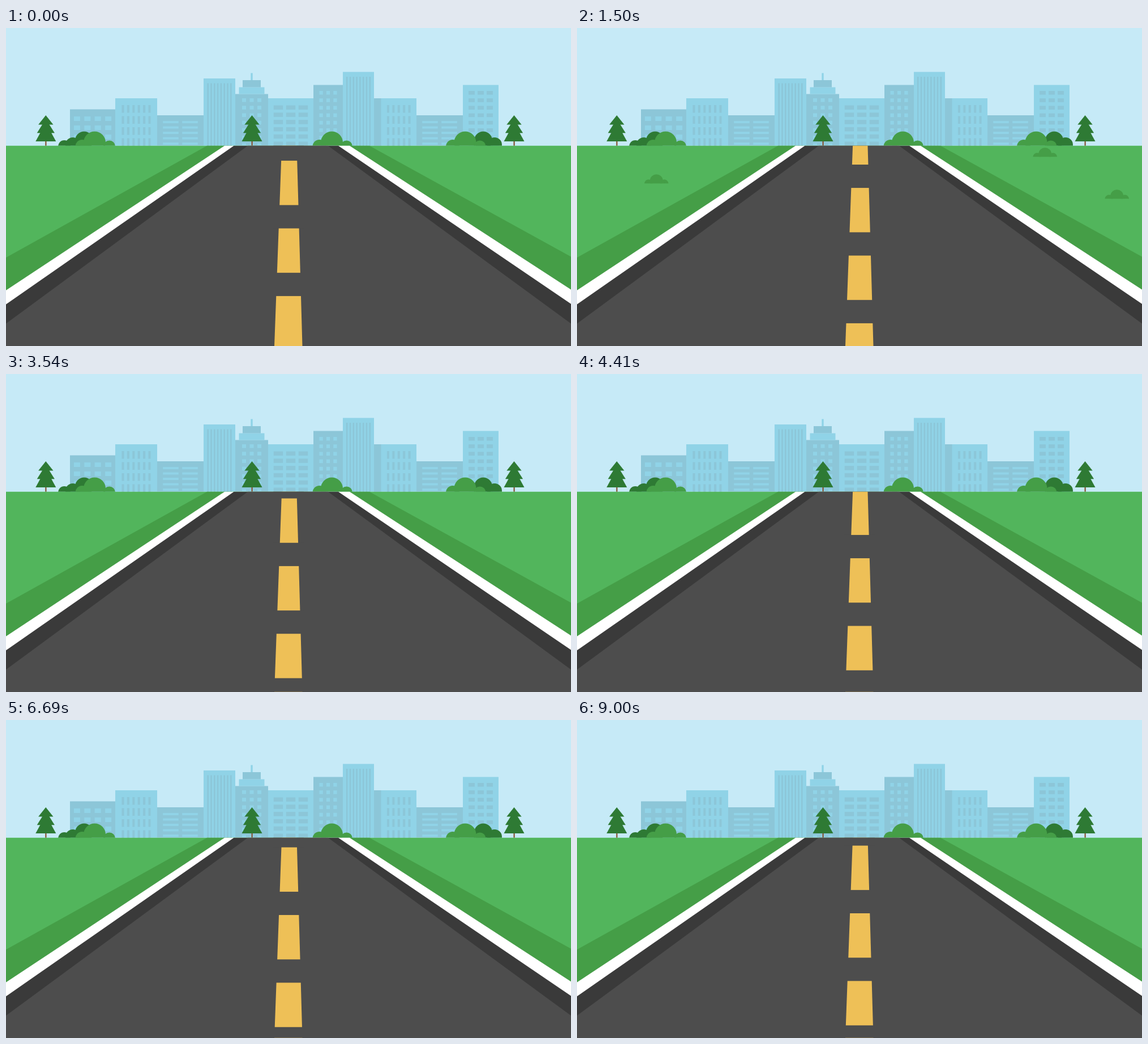
Recreate the animation shown at these times as an HTML page with a canvas. Size 998 px wide and 561 px high, loop 9030 ms.

```html
<!DOCTYPE html>
<html lang="en">
<head>
<meta charset="utf-8">
<title>Road</title>
<style>
html, body { margin: 0; width: 100%; height: 100%; overflow: hidden; background: #c6eaf7; }
canvas { display: block; width: 998px; height: 561px; }
</style>
</head>
<body>
<canvas id="stage" width="998" height="561"></canvas>
<script>
const W = 998, H = 561, HORIZON = 207.7;
const LOOP = 9030, STEP = 30;
const CYCLE = 60, CYCLES = 5, TRAVEL = 823.3;
const PITCH = 119.4, GAP = 41.1, FIRST_GAP = 431.8;
const C = {
  sky: '#c6eaf7', light: '#90d3e7', dark: '#8cc6d8', grass: '#52b55c', verge: '#459e47',
  tree: '#2e7a34', trunk: '#86512f', road: '#4d4d4d', edge: '#3a3a3a', line: '#eec057'
};

const stage = document.getElementById('stage').getContext('2d');
const scenery = document.createElement('canvas');
scenery.width = W;
scenery.height = H;

function rect(g, color, x, y, w, h) {
  g.fillStyle = color;
  g.fillRect(x, y, w, h);
}

function poly(g, color, ...pts) {
  g.fillStyle = color;
  g.beginPath();
  for (let i = 0; i < pts.length; i += 2) g.lineTo(pts[i], pts[i + 1]);
  g.fill();
}

function dome(g, color, x, y, r) {
  g.fillStyle = color;
  g.beginPath();
  g.arc(x, y, r, 0, Math.PI * 2);
  g.fill();
}

function clipped(g, x, y, w, h, paint) {
  g.save();
  g.beginPath();
  g.rect(x, y, w, h);
  g.clip();
  paint();
  g.restore();
}

// Window patterns: columns, pane size, spacing and distance from the roof.
const slots = cols => ({ cols, w: 4, h: 13.5, dx: 9.4, dy: 19.5, top: 12 });
const panes = (w, dx, cols = 3) => ({ cols, w, h: 6.6, dx, dy: 13.2, top: 10.5 });
const strips = { cols: 2, w: 27.5, h: 4, dx: 34, dy: 9.5, top: 10 };
const ribs = { cols: 8, w: 2.5, h: H, dx: 5.8, dy: H, top: 8.5 };

function building(g, left, right, roof, wall, glass, s) {
  rect(g, wall, left, roof, right - left, HORIZON - roof);
  const x0 = (left + right - (s.cols - 1) * s.dx - s.w) / 2;
  for (let y = roof + s.top; y < HORIZON; y += s.dy)
    for (let c = 0; c < s.cols; c++) rect(g, glass, x0 + c * s.dx, y, s.w, s.h);
}

function city(g) {
  const bright = (l, r, top, s) => building(g, l, r, top, C.light, C.dark, s);
  const dim = (l, r, top, s) => building(g, l, r, top, C.dark, C.light, s);
  dim(113, 193, 143.5, { cols: 4, w: 11, h: 8, dx: 18.4, dy: 16, top: 12.5 });
  bright(193, 267, 124, slots(6));
  dim(267, 349, 154, strips);
  bright(349, 405, 89, ribs);
  dim(405, 463, 116.5, { ...panes(7, 13.5), top: 7.5 });
  rect(g, C.light, 411.5, 104.5, 45, 12);
  rect(g, C.dark, 418, 92, 32, 12.5);
  rect(g, C.light, 432.3, 79.5, 3.4, 12.5);
  bright(463, 543, 124, { ...panes(16.5, 22), h: 7.5, dy: 12.8, top: 12.5 });
  dim(543, 595, 100.5, panes(6.4, 12.4));
  bright(595, 650, 77.5, ribs);
  rect(g, C.dark, 650, 124, 13, 84);
  bright(662.5, 725, 124, slots(5));
  dim(725, 807, 154, strips);
  bright(807, 870, 100.5, panes(11, 16));
}

function tree(g, x) {
  rect(g, C.trunk, x - 1, 199, 2.2, 9);
  for (let i = 0; i < 3; i++) {
    const base = 170.5 + 14.8 * i, half = 13.2 + 2.4 * i;
    poly(g, C.tree, x, 154 + 6.5 * i, x + half, base, x - half, base);
  }
}

function bush(g, x) {
  dome(g, C.verge, x - 22, 209, 12);
  dome(g, C.verge, x, 202, 19.5);
  dome(g, C.verge, x + 26, 209, 10.5);
}

function shrub(g, x, side) {
  dome(g, C.tree, x, 198.5, 16);
  dome(g, C.tree, x + side * 20, 206, 13);
}

function paintScenery(g) {
  rect(g, C.sky, 0, 0, W, H);
  clipped(g, 0, 0, W, HORIZON, () => {
    city(g);
    [70.3, 434.5, 897.5].forEach(x => tree(g, x));
    dome(g, C.tree, 103, 209, 11);
    shrub(g, 138, -1);
    shrub(g, 843, 1);
    [156.5, 575.5, 811].forEach(x => bush(g, x));
  });
}

// Everything below the line from the left edge over the road top to the right edge.
function slope(g, color, leftY, x0, x1, rightY) {
  poly(g, color, 0, leftY, x0, HORIZON, x1, HORIZON, W, rightY, W, H, 0, H);
}

function paintRoad(g) {
  slope(g, C.verge, 405, 355, 642, 403.5);
  slope(g, '#fff', 462.7, 386, 607, 461.5);
  slope(g, C.edge, 487.4, 402.5, 587, 486.7);
  slope(g, C.road, 521.5, 427, 569, 521.5);
  poly(g, C.line, 487.1, HORIZON, 513.5, HORIZON, 523.5, H, 474, H);
}

// Constant acceleration to the middle, then constant braking.
const ease = u => u < 0.5 ? 2 * u * u : 1 - 2 * (1 - u) * (1 - u);

// A late start, and a little more than a step gained every second cycle.
function travel(n) {
  const late = n - 1.35 + 1.2 * Math.floor((n + CYCLE) / (2 * CYCLE));
  const u = Math.max(0, late / CYCLE);
  return TRAVEL * (u >= CYCLES ? 1 : ease(u % 1));
}

// Tufts drift outwards: position at a given travel; the side sets the direction.
const tufts = [
  { x: 2, y: 358, at: 68.5 }, { x: 983, y: 349, at: 68.5 },
  { x: 145.5, y: 271, at: 763 }, { x: 821.5, y: 224, at: 763 }, { x: 948.5, y: 298, at: 763 }
];

function paintTuft(g, t, p) {
  const dy = (p - t.at) * 2.3, y = t.y + dy;
  const x = t.x + Math.sign(t.x - W / 2) * dy / 0.608;
  const top = Math.max(HORIZON, y - 17);
  if (y <= top) return;
  clipped(g, x - 22, top, 44, y - top, () => {
    dome(g, C.verge, x - 14, y + 0.5, 7.3);
    dome(g, C.verge, x, y - 4.5, 11.5);
    dome(g, C.verge, x + 14, y + 0.5, 7.3);
    rect(g, C.verge, x - 14, y - 4, 28, 4);
  });
}

function draw(n) {
  const g = stage, p = travel(n);
  g.drawImage(scenery, 0, 0);
  rect(g, C.grass, 0, HORIZON, W, H - HORIZON);
  tufts.forEach(t => paintTuft(g, t, p));
  paintRoad(g);
  clipped(g, 472, HORIZON, 54, H - 0.3 - HORIZON, () => {
    for (let y = FIRST_GAP + p; y + GAP > HORIZON; y -= PITCH) rect(g, C.road, 472, y, 54, GAP);
  });
}

paintScenery(scenery.getContext('2d'));
const start = performance.now();
function tick() {
  draw(Math.floor(((performance.now() - start) % LOOP) / STEP));
  requestAnimationFrame(tick);
}
tick();
</script>
</body>
</html>
```
